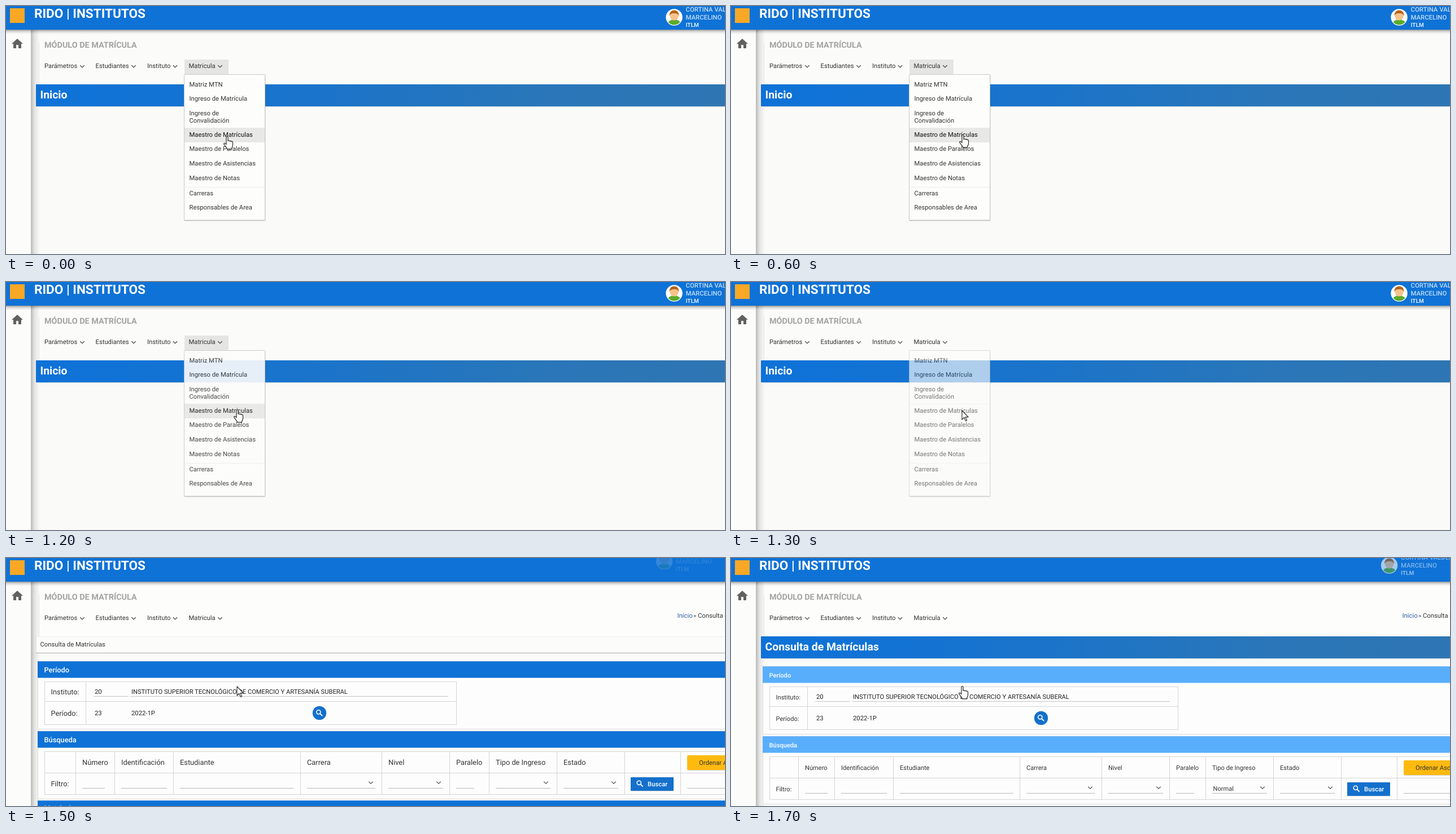
Write an HTML page that moves like this. It is 1273 by 440 pixels and loops after 1.8 s.

```html
<!DOCTYPE html>
<html lang="es">
<head>
<meta charset="utf-8">
<title>Módulo de matrícula</title>
<style>
  html, body { margin: 0; width: 100%; height: 100%; overflow: hidden; background: #fafaf8; }
  svg { display: block; }
  text { font-family: Roboto, sans-serif; text-rendering: geometricPrecision; white-space: pre; }
</style>
</head>
<body>
<svg id="stage" width="1273" height="440" viewBox="0 0 1273 440">
  <defs>
    <linearGradient id="bar" gradientUnits="userSpaceOnUse" x1="53" y1="0" x2="1273" y2="0">
      <stop offset="0" stop-color="#0e72d8"/>
      <stop offset=".25" stop-color="#1473d2"/>
      <stop offset=".75" stop-color="#2a76b8"/>
      <stop offset="1" stop-color="#2e75b3"/>
    </linearGradient>
    <linearGradient id="down" x2="0" y2="1">
      <stop offset="0" stop-color="#000" stop-opacity=".38"/>
      <stop offset=".45" stop-color="#000" stop-opacity=".12"/>
      <stop offset="1" stop-color="#000" stop-opacity="0"/>
    </linearGradient>
    <linearGradient id="side">
      <stop offset="0" stop-color="#000" stop-opacity=".26"/>
      <stop offset=".4" stop-color="#000" stop-opacity=".09"/>
      <stop offset="1" stop-color="#000" stop-opacity="0"/>
    </linearGradient>
    <clipPath id="face"><circle cx="1183" cy="20" r="13.6"/></clipPath>
  </defs>
</svg>
<script>
const BLUE = '#0f72d6', INK = '#333', RULE = '#d4d4d4', LOOP = 1800;
const stage = document.getElementById('stage');

function add(parent, tag, attrs, content) {
  const node = document.createElementNS('http://www.w3.org/2000/svg', tag);
  for (const key in attrs) node.setAttribute(key, attrs[key]);
  if (content) node.textContent = content;
  return parent.appendChild(node);
}
const group = parent => add(parent, 'g', {});
const rect = (p, x, y, x2, y2, fill, more) =>
  add(p, 'rect', { x, y, width: x2 - x, height: y2 - y, fill, ...more });
const path = (p, d, stroke, width = 1, fill = 'none') =>
  add(p, 'path', { d, stroke, 'stroke-width': width, fill, 'stroke-linejoin': 'round' });
const hline = (p, x, x2, y, color = RULE) => rect(p, x, y, x2, y + 1, color);
const vline = (p, x, y, y2, color = RULE) => rect(p, x, y, x + 1, y2, color);
const label = (p, x, y, str, size = 11.25, fill = INK, weight = 400) =>
  add(p, 'text', { x, y, fill, 'font-size': size, 'font-weight': weight }, str);
const chevron = (p, x, y, color = '#444') =>
  path(p, `M${x - 3.7} ${y - 1.8}l3.7 3.7l3.7-3.7`, color, 1.3);

function lens(p, x, y) {
  add(p, 'circle', { cx: x - 1.2, cy: y - 1.2, r: 3.6, fill: 'none', stroke: '#fff', 'stroke-width': 1.6 });
  path(p, `M${x + 1.4} ${y + 1.4}l4.2 4.2`, '#fff', 1.9);
}

function banner(p, title) {
  rect(p, 53, 139, 1273, 178, 'url(#bar)', { rx: 1 });
  hline(p, 53, 1273, 178, '#cfd6dc');
  label(p, 60.5, 164, title, 19.4, '#fff', 700);
}

// Shared page parts
rect(stage, 0, 0, 1273, 440, '#fafaf8');
rect(stage, 44, 42, 60, 440, 'url(#side)');
const whitePanel = rect(stage, 59, 46, 1273, 139, '#fdfdfc');
vline(stage, 58, 64, 139, '#e6e6e4');
rect(stage, 0, 42, 44, 440, '#fcfcfb');
rect(stage, 0, 42, 1273, 50, 'url(#down)');
rect(stage, 0, 0, 1273, 42, BLUE);
rect(stage, 7, 4, 33, 30, '#f9a825');
label(stage, 50, 21.3, 'RIDO | INSTITUTOS', 22.6, '#fff', 700);
path(stage, 'M18 75v-6h4v6h5v-8h3l-10-9l-10 9h3v8z', 'none', 0, '#616161');
label(stage, 68, 73.5, 'MÓDULO DE MATRÍCULA', 14.4, '#a3a3a3', 700);

const menuTab = rect(stage, 316, 95, 394, 121, '#e5e5e3');
[['Parámetros', 68, 135], ['Estudiantes', 158.5, 226], ['Instituto', 250, 299.5], ['Matricula', 323.5, 379]]
  .forEach(([name, x, arrow]) => {
    label(stage, x, 110, name);
    chevron(stage, arrow, 107);
  });

// Signed-in user
const user = group(stage);
add(user, 'circle', { cx: 1183, cy: 20, r: 14.7, fill: '#fff' });
const avatar = add(user, 'g', { 'clip-path': 'url(#face)' });
add(avatar, 'ellipse', { cx: 1183, cy: 32, rx: 11.5, ry: 8, fill: '#5cab2c' });
add(avatar, 'ellipse', { cx: 1183, cy: 17.5, rx: 7.5, ry: 8, fill: '#f7c48b' });
path(avatar, 'M1174.5 18c-1-14 18-14 17 0c-2-5-5-5-8.5-5s-6.5 0-8.5 5z', 'none', 0, '#b5641c');
label(user, 1203.5, 10, 'CORTINA VALDERAS', 11.35, '#bfdcf6', 500);
label(user, 1203.5, 24, 'MARCELINO', 11.35, '#bfdcf6', 500);
label(user, 1203.5, 36.5, 'ITLM', 10, '#d9ebfb', 700);

// Start view with the drop-down
const home = group(stage);
banner(home, 'Inicio');
const menu = group(home);
rect(menu, 315, 121, 460, 382, '#000', { opacity: .08, rx: 2 });
rect(menu, 315.5, 121.5, 458.5, 380, '#fdfdfc', { stroke: '#c9c9c9', rx: 1 });
hline(menu, 316, 458, 380, '#bdbdbd');
hline(menu, 317, 458, 216, '#ececec');
hline(menu, 317, 458, 321, '#ececec');
const hover = rect(menu, 316, 216, 458, 242, '#e8e8e6');
const items = [['Matriz MTN', 143], ['Ingreso de Matrícula', 168], ['Ingreso de', 194], ['Convalidación', 207],
  ['Maestro de Matrículas', 232], ['Maestro de Paralelos', 257], ['Maestro de Asistencias', 283],
  ['Maestro de Notas', 309], ['Carreras', 336], ['Responsables de Area', 361]]
  .map(([name, y]) => label(menu, 324.5, y, name));
const chosen = items[4];

// Query form; the themed version is denser and sits lower
const HEADS = ['Número', 'Identificación', 'Estudiante', 'Carrera', 'Nivel', 'Paralelo', 'Tipo de Ingreso', 'Estado'];
const FIELD = [40, 81, 201, 121, 97, 32, 97, 97];
const SELECTS = [3, 4, 6, 7];

function form({ dy, dx, size, color, cols }) {
  const g = group(stage);
  const panel = (y, title) => {
    rect(g, 56.5, y + .5, 1280, y + 120.5, '#fdfdfd', { stroke: '#dcdcdc' });
    rect(g, 56, y + .3, 1273, y + 29.6, color);
    label(g, 67.5, y + 19.5, title, size, '#fff', 500);
  };
  const box = (x, x2, y, y2, mid) => {
    [y, mid, y2].forEach(v => hline(g, x, x2 + 1, v));
    vline(g, x, y, y2);
    vline(g, x2, y, y2);
  };
  panel(183 + dy, 'Período');
  box(68, 797 + dx, 219 + dy, 295 + dy, 254 + dy);
  vline(g, 141 + dx, 219 + dy, 295 + dy);
  label(g, 79.5, 241.5 + dy, 'Instituto:', size);
  label(g, 79.5, 279.5 + dy, 'Período:', size);
  label(g, 157 + dx, 241 + dy, '20', 11.25, '#222');
  label(g, 222 + dx, 241 + dy, 'INSTITUTO SUPERIOR TECNOLÓGICO DE COMERCIO Y ARTESANÍA SUBERAL', 11.15, '#222');
  label(g, 157 + dx, 279 + dy, '23', 11.25, '#222');
  label(g, 222 + dx, 279 + dy, '2022-1P', 11.25, '#222');
  hline(g, 155 + dx, 217 + dx, 245 + dy, '#c4c4c4');
  hline(g, 220 + dx, 783 + dx, 245 + dy, '#c4c4c4');
  add(g, 'circle', { cx: 555 + dx, cy: 275 + dy, r: 12.2, fill: '#1470cc' });
  lens(g, 554.5 + dx, 274.5 + dy);

  panel(307 + dy, 'Búsqueda');
  box(68, 1273, 343 + dy, 419 + dy, 381 + dy);
  cols.forEach(x => vline(g, x, 343 + dy, 419 + dy));
  label(g, 79.5, 404.5 + dy, 'Filtro:', size);
  HEADS.forEach((head, i) => {
    const x = cols[i] + 12, end = x + FIELD[i];
    label(g, x, 367 + dy, head, size);
    hline(g, x, end, 408 + dy, '#b8b8b8');
    if (SELECTS.includes(i)) chevron(g, end - 8, 398.5 + dy, '#555');
  });
  const action = cols[8] + 11, last = cols[9] + 12;
  rect(g, action, 389 + dy, action + 76, 414 + dy, '#000', { opacity: .15, rx: 2 });
  rect(g, action, 389 + dy, action + 76, 413 + dy, '#1470cc', { rx: 1 });
  lens(g, action + 16, 400 + dy);
  label(g, action + 30, 405 + dy, 'Buscar', 11.3, '#fff', 500);
  rect(g, last, 351 + dy, 1280, 377 + dy, '#000', { opacity: .18, rx: 2 });
  rect(g, last, 350 + dy, 1280, 376 + dy, '#ffba10', { rx: 2 });
  label(g, last + 21, 367 + dy, 'Ordenar Ascendente', 11.25);
  g.sortLine = hline(g, last, 1273, 408 + dy, '#b8b8b8');
  return g;
}

const plain = form({ dy: 0, dx: 0, size: 12.8, color: BLUE,
  cols: [123, 192, 296, 521, 665, 785, 855, 975, 1095, 1194] });
rect(plain, 53, 139, 1273, 168, '#fcfcfb');
hline(plain, 53, 1273, 139, '#ededed');
vline(plain, 53, 139, 168, '#e2e2e2');
hline(plain, 53, 1273, 168, '#a9a9a9');
label(plain, 60.5, 157, 'Consulta de Matrículas');
const results = group(plain);
rect(results, 56, 430.3, 1273, 440, BLUE);
label(results, 67.5, 448, 'Matrículas', 12.8, '#a9cdf2', 500);

const themed = form({ dy: 9, dx: -6, size: 11.1, color: '#59aefb',
  cols: [119, 183, 287, 511, 656, 776, 840, 960, 1080, 1179] });
banner(themed, 'Consulta de Matrículas');
label(themed, 853.5, 412.5, 'Normal', 11.1);

const crumbs = group(stage);
label(crumbs, 1205.5, 106, 'Inicio', 11.35, '#2f629e');
label(crumbs, 1234, 106, '>', 10);
label(crumbs, 1242, 106, 'Consulta de Matrículas');

// Pointers
const hand = path(stage, 'M5 2a1.5 1.5 0 0 1 3 0v6.5c.5-1.2 2.6-1 3 .4c.6-1 2.5-.7 2.9.7c.8-.8 2.6-.4 2.6 1.3v5c0 3-2 3.5-2 7h-8c0-2.5-3-4.5-5.5-8.5c-1-1.7 1-2.8 2.3-1.5l1.7 1.6z',
  '#222', 1.15, '#fff');
const arrow = path(stage, 'M0 0v16l3.8-3.6l2.6 6l2.2-1l-2.6-5.8h5.2z', '#222', 1.1, '#fff');
arrow.setAttribute('transform', 'translate(409 228)');

// [time, x, y] of the hand
const HAND = [[0, 385, 231], [100, 387, 231], [200, 392, 229], [300, 397, 226], [400, 401, 224],
  [500, 403, 225], [600, 404, 228], [900, 403, 226]];
// [time, opacity, x shift, y shift] of the user block
const USER = [[0, 1, 0, 0], [1400, 0, 0, 0], [1500, .15, -17.5, -14], [1600, .4, -17.5, -11], [1700, .63, -17.5, -7]];
const MENU = [[0, 1], [1200, .9], [1300, .66]];

const at = (table, t) => table.filter(row => row[0] <= t).pop().slice(1);
const show = (node, on) => node.setAttribute('visibility', on ? 'visible' : 'hidden');
const move = (node, x, y) => node.setAttribute('transform', `translate(${x} ${y})`);

function draw(t) {
  const queried = t >= 1400, ready = t >= 1700, wide = t < 1500, hovering = t < 1300;
  const [alpha, ux, uy] = at(USER, t);
  user.setAttribute('opacity', alpha);
  move(user, ux, uy);
  menu.setAttribute('opacity', at(MENU, t)[0]);
  show(home, !queried);
  hover.setAttribute('opacity', hovering ? 1 : 0);
  chosen.setAttribute('fill', hovering ? '#111' : INK);
  show(menuTab, hovering);
  whitePanel.setAttribute('opacity', queried ? 1 : .4);
  show(plain, queried && !ready);
  results.setAttribute('opacity', wide ? 0 : 1);
  plain.sortLine.setAttribute('y', wide ? 400 : 408);
  show(themed, ready);
  show(crumbs, queried);
  move(crumbs, wide ? 0 : -17, 0);
  show(hand, hovering || ready);
  move(hand, ...(ready ? [403, 227] : at(HAND, t)));
  show(arrow, !hovering && !ready);
}

const start = performance.now();
function tick() {
  draw((performance.now() - start) % LOOP);
  requestAnimationFrame(tick);
}
tick();
</script>
</body>
</html>
```
